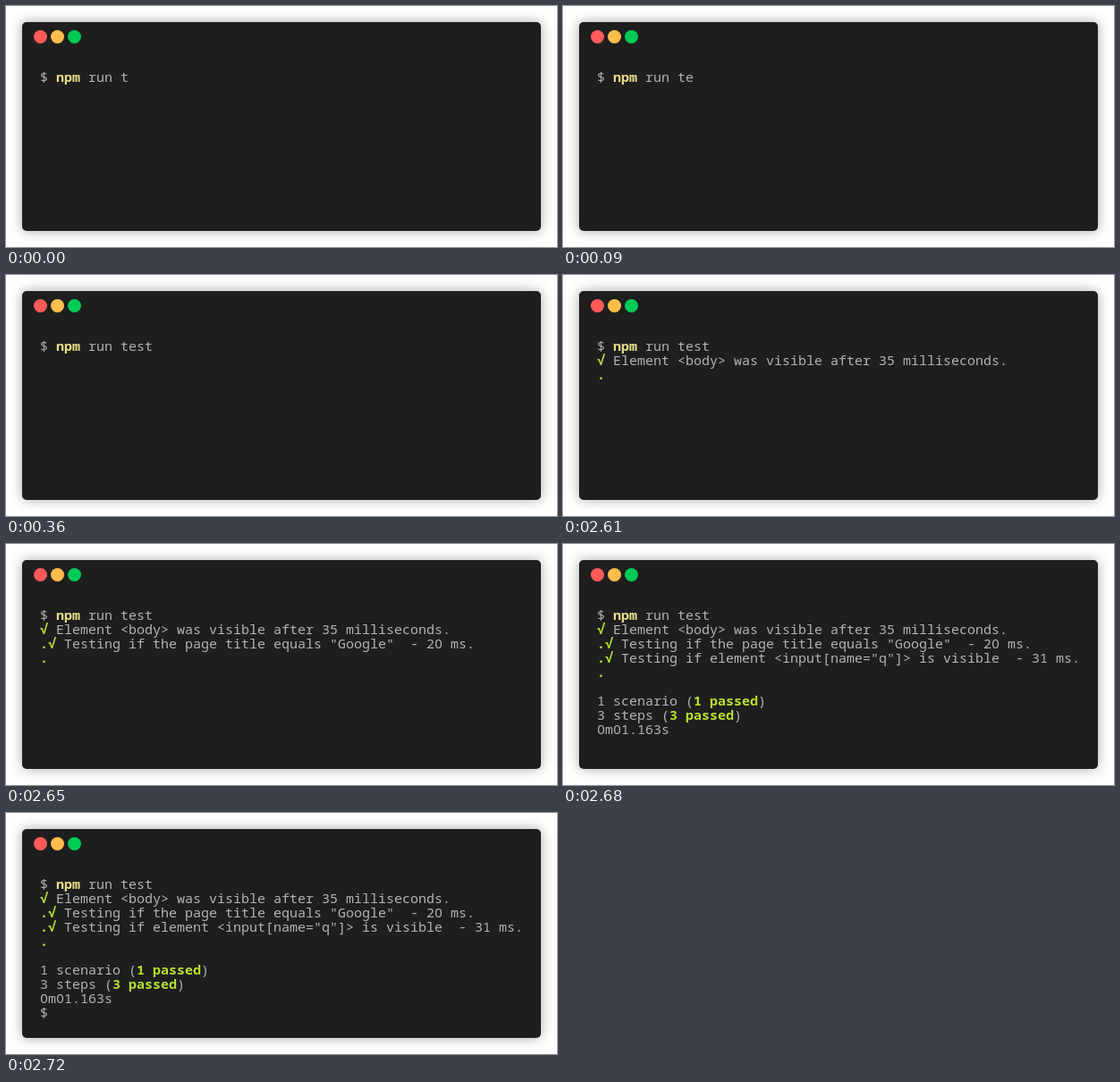
Animation of 616x270 px, one loop 8000 ms. Source, as an HTML page:

```html
<!DOCTYPE html>
<html lang="en">
<head>
<meta charset="utf-8">
<title>Terminal test run</title>
<style>
  html, body { margin: 0; width: 100%; height: 100%; overflow: hidden; background: #fff; }
  svg { display: block; width: 616px; height: 270px; }
  .window { fill: #1e1e1e; filter: drop-shadow(0 0 7px rgba(0, 0, 0, .34)); }
  text { font: 15px "Noto Sans Mono", "DejaVu Sans Mono", monospace; fill: #b3b3b3; white-space: pre; }
  .cmd { fill: #e8de8a; font-weight: 600; }
  .ok { fill: var(--ok); font-weight: 600; }
  .zero { font-family: "Noto Sans", sans-serif; }
</style>
</head>
<body>
<svg viewBox="0 0 616 270">
  <rect class="window" x="18" y="18" width="580" height="234" rx="5"/>
  <circle cx="38.5" cy="34.5" r="7.5" fill="#ff5a5a"/>
  <circle cx="57.5" cy="34.5" r="7.5" fill="#ffbd4c"/>
  <circle cx="76.5" cy="34.5" r="7.5" fill="#00ca56"/>
  <g id="screen"></g>
</svg>
<script>
const LOOP = 8000, LEFT = 38, BASE = 85, CELL = 9, ROW = 16;
const screen = document.getElementById('screen');

const plain = s => [s, ''];
const ok = s => [s, 'ok'];
const prompt = typed => [plain('$ '), ['npm', 'cmd'], plain(' run ' + typed)];

const checks = [
  [ok('√'), plain(' Element <body> was visible after 35 milliseconds.')],
  [ok('.√'), plain(' Testing if the page title equals "Google"  - 20 ms.')],
  [ok('.√'), plain(' Testing if element <input[name="q"]> is visible  - 31 ms.')]
];
const summary = [
  [],
  [plain('1 scenario ('), ok('1 passed'), plain(')')],
  [plain('3 steps ('), ok('3 passed'), plain(')')],
  [plain('0m01.163s')]
];

const typing = [[0, 1], [90, 2], [300, 3], [360, 4]];
const output = [[2610, 1], [2650, 2], [2680, 3]];
const tints = ['#b5e030', '#c3d04a', '#bdd634', '#b5e030'];

// Latest value whose start time has passed
const at = (steps, t) => steps.reduce((v, [start, next]) => t >= start ? next : v, 0);

function linesAt(t) {
  const done = at(output, t);
  const lines = [prompt('test'.slice(0, at(typing, t)))];
  if (done) lines.push(...checks.slice(0, done), [ok('.')]);
  if (done === 3) lines.push(...summary);
  if (t >= 2720) lines.push([plain('$')]);
  return lines;
}

function addText(str, cls, col, row) {
  const el = document.createElementNS('http://www.w3.org/2000/svg', 'text');
  const zero = str === '0';
  el.setAttribute('x', LEFT + col * CELL + (zero ? 0.2 : 0));
  el.setAttribute('y', BASE + row * ROW);
  el.setAttribute('class', zero ? cls + ' zero' : cls);
  el.textContent = str;
  screen.append(el);
}

let shown = '';
function render(t) {
  const lines = linesAt(t), key = JSON.stringify(lines);
  if (key === shown) return;
  shown = key;
  screen.replaceChildren();
  screen.style.setProperty('--ok', tints[at(output, t)]);
  lines.forEach((line, row) => {
    let col = 0;
    for (const [str, cls] of line) {
      // Zeros are set apart to get an unslashed glyph
      for (const part of str.split(/(0)/)) {
        if (part) addText(part, cls, col, row);
        col += part.length;
      }
    }
  });
}

const start = performance.now();
function tick() {
  render((performance.now() - start) % LOOP);
  requestAnimationFrame(tick);
}
tick();
</script>
</body>
</html>
```
